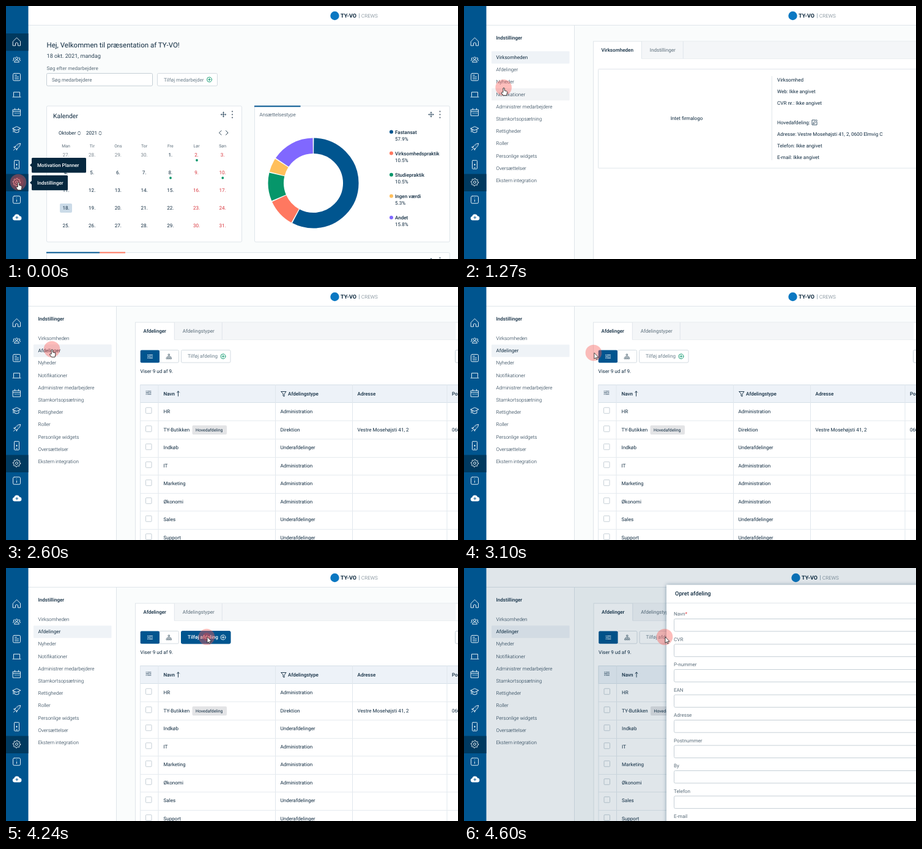
Write an HTML page that moves like this. It is 739x415 px and loops after 4.98 s.

```html
<!DOCTYPE html>
<html lang="da">
<head>
<meta charset="utf-8">
<style>
html, body { margin: 0; width: 100%; height: 100%; overflow: hidden; background: #fff }
svg { display: block; width: 739px; height: 415px }
text { font-family: Roboto, sans-serif; white-space: pre; text-rendering: geometricPrecision }
.icon { fill: none; stroke-width: .9; stroke-linecap: round; stroke-linejoin: round }
#panel { filter: drop-shadow(0 0 3px #00335566) }
</style>
</head>
<body>
<svg id="stage" viewBox="0 0 739 415"></svg>
<script>
const LOOP = 4980;
const BLUE = '#00558f', NAVY = '#00395f', INK = '#102b40', SOFT = '#5b6d7a', LINE = '#dfe5ea', GREEN = '#06966a';

// y is the vertical middle of the text
const text = (x, y, s, { size = 8.08, fill = INK, weight = 400, anchor = 'start', id = '' } = {}) =>
  `<text ${id && `id="${id}"`} x="${x}" y="${y + size * .33}" font-size="${size}" fill="${fill}" font-weight="${weight}" text-anchor="${anchor}">${s}</text>`;
const rect = (x, y, w, h, fill = '#fff', stroke = 'none', rx = 0, id = '') =>
  `<rect ${id && `id="${id}"`} x="${x}" y="${y}" width="${w}" height="${h}" rx="${rx}" fill="${fill}" stroke="${stroke}"/>`;
const line = (x1, y1, x2, y2, stroke = LINE) => `<path d="M${x1} ${y1}L${x2} ${y2}" stroke="${stroke}"/>`;
const dot = (x, y, r, fill, id = '', opacity = 1) =>
  `<circle ${id && `id="${id}"`} cx="${x}" cy="${y}" r="${r}" fill="${fill}" opacity="${opacity}"/>`;
const icon = (x, y, d, stroke = '#fff') => `<path class="icon" transform="translate(${x} ${y})" stroke="${stroke}" d="${d}"/>`;
const group = (id, ...parts) => `<g id="${id}">${parts.flat().join('')}</g>`;
const ring = r => `M${r} 0A${r} ${r} 0 1 1 ${-r} 0A${r} ${r} 0 1 1 ${r} 0`;
const PLUS = ring(4) + 'M-2 0H2M0-2V2';
const LIST = 'M-4-2.500H-3M-1.500-2.500H4M-4 0H1M2.500 0H4M-4 2.500H-3M-1.500 2.500H4';
const TREE = 'M-1-4H1V-2H-1ZM0-2V2M-3 2V0H3V2M-4 2H-2V4H-4ZM-1 2H1V4H-1ZM2 2H4V4H2Z';

const gear = Array.from({ length: 33 }, (_, i) => {
  const a = i * Math.PI / 16, r = i % 4 < 2 ? 6.2 : 4.7;
  return `${i ? 'L' : 'M'}${(r * Math.cos(a)).toFixed(1)} ${(r * Math.sin(a)).toFixed(1)}`;
}).join('') + ring(2);

const SIDE_ICONS = [
  'M-6-1L0-7L6-1V6H2V2Q0 0-2 2V6H-6Z',
  'M2-2A2 2 0 1 1-2-2A2 2 0 1 1 2-2M-4 4Q-4 1 0 1Q4 1 4 4ZM-3.5-3A1.5 1.5 0 1 0-4 0Q-6 0-6 2M3.5-3A1.5 1.5 0 1 1 4 0Q6 0 6 2',
  'M-4-6H4Q6-6 6-4V4Q6 6 4 6H-4Q-6 6-6 4V-4Q-6-6-4-6M-3-3H0M-3 0H3M-3 3H3',
  'M-5 3V-4H5V3M-6.5 4H6.5',
  'M-6-4H6V6H-6ZM-6-1H6M-3-6V-4M3-6V-4M-3 2H-2M0 2H1M3 2H4',
  'M-6.5-2L0-5L6.5-2L0 1ZM-3.5 0V4Q0 6 3.5 4V0M-5.5-1V4',
  'M6-6Q0-6-3 1L-1 3Q6 0 6-6M-2-1L-5 0L-3 1M1 2L0 5L-1 3M-3 3L-5 5M2-2H2.1',
  'M-3-7H3Q4-7 4-6V6Q4 7 3 7H-3Q-4 7-4 6V-6Q-4-7-3-7M-1 0H1M0-1V1M-1 5H1',
  gear,
  'M-4-6H4Q6-6 6-4V4Q6 6 4 6H-4Q-6 6-6 4V-4Q-6-6-4-6M0-3V-2.9M0 0V3',
];

const sidebar = group('sidebar',
  rect(0, 0, 36.5, 415, BLUE),
  rect(0, 45, 36.5, 28.5, NAVY, 'none', 0, 'homeActive'),
  rect(0, 275.5, 36.5, 28.5, NAVY),
  SIDE_ICONS.map((d, i) => icon(17.5, 59 + 28.75 * i, d)),
  '<path d="M14 351.500a3.300 3.300 0 0 1-.7-6.500a4.600 4.600 0 0 1 8.800-.5a3.500 3.500 0 0 1-.4 7Z" fill="#fff"/>',
  icon(17.8, 347, 'M-2 0H2M0-2V2', BLUE));

const header = group('header',
  rect(36, 0, 703, 31), line(36, 31.5, 739, 31.5),
  group('brand', dot(537.5, 16, 7.2, '#0b78c2'),
    text(547, 16, 'TY-VO', { size: 9, weight: 700 }),
    line(577.5, 12, 577.5, 20, '#9fb0bc'),
    text(581, 16, 'CREWS', { size: 8, weight: 300, fill: SOFT })));

const cardTools = (x, y) => icon(x, y, 'M-4 0H4M0-4V4M-1-3L0-4L1-3M-1 3L0 4L1 3M-3-1L-4 0L-3 1M3-1L4 0L3 1', '#29465c') +
  [-5, 0, 5].map(d => dot(x + 14.5, y + d, 1.2, '#7c8a95')).join('');

const DAYS = ['Man', 'Tir', 'Ons', 'Tor', 'Fre', 'Lør', 'Søn'];
const colX = c => 98 + 42.7 * c;
const dates = Array.from({ length: 35 }, (_, i) => {
  const day = i < 4 ? 27 + i : i - 3, col = i % 7;
  const fill = i < 4 ? '#7b8790' : col > 4 ? '#d8343c' : INK;
  return text(colX(col), 244.5 + 29 * Math.floor(i / 7), day + '.', { fill, anchor: 'middle' });
});

const SHARES = [
  ['Fastansat', 57.9, BLUE], ['Virksomhedspraktik', 10.5, '#ff7860'], ['Studiepraktik', 10.5, GREEN],
  ['Ingen værdi', 5.3, '#ffbf5c'], ['Andet', 15.8, '#8068ff'],
];
let sum = 0;
const donut = SHARES.map(([name, pct, color], i) => {
  const y = 207 + 35.1 * i;
  const arc = `<circle cx="502.5" cy="290.5" r="61.3" pathLength="100" fill="none" stroke="${color}" stroke-width="25.500"
    stroke-dasharray="${pct - .4} 100" stroke-dashoffset="${-sum - .2}" transform="rotate(-90 502.500 290.500)"/>`;
  sum += pct;
  return arc + dot(630, y - .5, 3, color) + text(636, y, name, { weight: 500 }) + text(636, y + 11, pct + '%');
});

const dashboard = group('dashboard',
  text(66.5, 64.5, 'Hej, Velkommen til præsentation af TY-VO!', { size: 11.54 }),
  text(66.5, 81.5, '18 okt. 2021, mandag', { size: 9.2, fill: '#2f4658' }),
  text(66.5, 102, 'Søg efter medarbejdere', { fill: SOFT }),
  rect(66.5, 110.5, 173, 20.5, '#fff', '#c5cfd6', 2),
  text(75, 121, 'Søg medarbejdere', { fill: SOFT }),
  rect(247.5, 110.5, 98, 20.5, '#fff', '#d3dbe1', 2),
  text(258, 121, 'Tilføj medarbejder', { fill: '#6c7f8c' }), icon(332.5, 120.7, PLUS, GREEN),
  rect(66.5, 164, 319, 223, '#fff', LINE, 2), rect(406.5, 164, 319, 223, '#fff', LINE, 2),
  rect(66.5, 404.5, 659, 40, '#fff', LINE, 2),
  rect(406, 163.5, 75.5, 2, BLUE), rect(66, 403.5, 87, 2, BLUE), rect(153, 403.5, 42, 2, '#ff7860'),
  cardTools(355.5, 178), cardTools(695, 178), cardTools(695, 418),
  text(77, 181, 'Kalender', { size: 10.4 }),
  text(86, 208.5, 'Oktober'), text(131, 208.5, '2021'),
  [119.5, 154].map(x => icon(x, 208.5, 'M-2-1L0-3L2-1M-2 1L0 3L2 1', INK)),
  icon(350.5, 208, 'M1.500-3.500L-2 0L1.500 3.500M9-3.500L12.500 0L9 3.500', INK),
  DAYS.map((d, i) => text(colX(i), 230, d, { size: 6.92, fill: SOFT, anchor: 'middle' })),
  rect(88, 324, 20, 15, '#cbdbe8', 'none', 2), dates,
  dot(312, 253, 1.9, GREEN), dot(269, 282, 1.9, GREEN), dot(354.3, 282, 1.9, GREEN),
  text(414.5, 178.5, 'Ansættelsestype', { weight: 300 }), donut);

const tooltip = (id, y, w, s) => group(id, rect(42, y - 12, w, 24.5, '#06283f', 'none', 1.5),
  `<path d="M42 ${y - 3}L39 ${y}L42 ${y + 3}Z" fill="#06283f"/>`, text(51, y + .3, s, { fill: '#fff', weight: 500 }));
const tooltips = tooltip('tipOld', 261, 89, 'Motivation Planner') + tooltip('tip', 289.7, 59, 'Indstillinger');

const MENU = ['Virksomheden', 'Afdelinger', 'Nyheder', 'Notifikationer', 'Administrer medarbejdere', 'Stamkortsopsætning',
  'Rettigheder', 'Roller', 'Personlige widgets', 'Oversættelser', 'Ekstern integration'];
const ROW = 20.2;
const menu = group('menu',
  rect(36, 32, 144, 383), line(180.5, 32, 180.5, 415),
  text(52.5, 52.3, 'Indstillinger', { weight: 500 }),
  rect(45, 74.3, 127.5, ROW, '#f2f4f6', 'none', 1, 'hover'), rect(45, 74.3, 127.5, ROW, '#eff3f7', 'none', 1, 'selected'),
  MENU.map((s, i) => text(52.5, 84.3 + ROW * i, s, { weight: 300, id: 'item' + i })));

const tabs = (first, x1, second, x2) => [
  rect(211.5, 58, 540, 370, '#fff', LINE),
  rect(x1, 58.5, 460, 28, '#f4f6f8'), line(x1, 58, x1, 86.5), line(x2, 58, x2, 86.5), line(x1, 86.5, 739, 86.5, '#eaeef1'),
  text(224.5, 72.2, first, { weight: 500 }), text(x1 + 13.5, 72.2, second, { fill: SOFT })];

const company = group('company',
  tabs('Virksomheden', 290.3, 'Indstillinger', 358.3),
  rect(219.5, 103.5, 540, 162.5, '#fff', LINE, 1), line(503.3, 115, 503.3, 253),
  text(364, 184.7, 'Intet firmalogo', { anchor: 'middle' }),
  [[121, 'Virksomhed'], [140, 'Web: Ikke angivet'], [159, 'CVR nr.: Ikke angivet'], [191, 'Hovedafdeling:'],
    [210, 'Adresse: Vestre Mosehøjsti 41, 2, 0600 Elmvig C'], [229, 'Telefon: Ikke angivet'], [248, 'E-mail: Ikke angivet']]
    .map(([y, s]) => text(512, y + .2, s)),
  icon(573, 191, 'M1-4H-4V4H4V-1M-2 2L-1.500 0L3-4.500L4.500-3L0 1.500Z', '#29465c'));

const DEPARTMENTS = [['HR', 'Administration'], ['TY-Butikken', 'Direktion'], ['Indkøb', 'Underafdelinger'], ['IT', 'Administration'],
  ['Marketing', 'Administration'], ['Økonomi', 'Administration'], ['Sales', 'Underafdelinger'], ['Support', 'Underafdelinger']];
const rowY = i => i ? 234.3 + 29.5 * (i - 1) : 204.3;
const addButton = (id, fill, stroke, ink, mark, weight) => group(id, rect(286.5, 103.5, 80.5, 20.5, fill, stroke, 2),
  text(297, 113.8, 'Tilføj afdeling', { fill: ink, weight }), icon(355, 113.8, PLUS, mark));

const departments = group('departments',
  tabs('Afdelinger', 275.3, 'Afdelingstyper', 353.3),
  rect(250.5, 103.5, 32, 20.5, '#fff', '#d3dbe1', 2), rect(219.7, 103.4, 31.3, 20.8, BLUE, 'none', 2),
  icon(235.5, 114, LIST), icon(266.5, 114, TREE, '#6c7f8c'),
  addButton('add', '#fff', '#d3dbe1', '#6c7f8c', GREEN, 400), addButton('addHover', BLUE, BLUE, '#fff', '#fff', 500),
  rect(734.5, 103.5, 20, 20.5, '#fff', '#c5cfd6', 2),
  text(219.5, 138.3, 'Viser 9 ud af 9.'),
  rect(219.5, 160.5, 540, 29, '#edf2f8', '#d5dfe8'),
  icon(233, 173.5, LIST, '#29465c'),
  text(257.5, 175.3, 'Navn', { weight: 500 }), icon(281.5, 175, 'M0 4V-4M-2-2L0-4L2-2', INK),
  icon(454, 175.5, 'M-4-4H4L1 0V4L-1 3V0Z', INK), text(461, 175.8, 'Afdelingstype', { weight: 500 }),
  text(574.5, 175, 'Adresse', { weight: 500 }), text(729, 175, 'Postnummer', { weight: 500 }),
  [219.5, 249, 440.5, 566.5, 721].map(x => line(x, 160, x, 415, '#e0e7ed')),
  DEPARTMENTS.map(([name, type], i) => {
    const y = rowY(i), bottom = Math.round(y + 15) + .5;
    return text(257.5, y, name) + text(448.5, y, type) + rect(228.5, y - 6.5, 9.5, 9.5, '#fff', '#c5cfd6', 1) +
      line(219, bottom, 739, bottom, '#e6ebef');
  }),
  rect(304.5, 227, 56.5, 15, '#e3e4e6', 'none', 2), text(310, 234.5, 'Hovedafdeling', { size: 6.92 }),
  text(574.5, 234.3, 'Vestre Mosehøjsti 41, 2'), text(729, 234.3, '0600'));

const FIELDS = ['Navn<tspan fill="#e0393e">*</tspan>', 'CVR', 'P-nummer', 'EAN', 'Adresse', 'Postnummer', 'By', 'Telefon', 'E-mail'];
const panel = rect(36, 0, 703, 415, '#003355', 'none', 0, 'dim') + group('panel',
  rect(331, 27.6, 420, 400), line(331, 57.5, 739, 57.5),
  text(345, 42.2, 'Opret afdeling', { size: 9.24, weight: 500 }),
  FIELDS.map((s, i) => text(343, 75.8 + 41.5 * i, s, { fill: SOFT }) + rect(343.5, 83.5 + 41.5 * i, 420, 20.4, '#fff', '#c5cfd6', 2)));

const pointer = group('pointer', dot(0, 0, 13.3, '#fa5a55', '', .4), dot(0, 0, 9, '#e83c46', 'ripple'),
  '<path id="hand" d="M-.8 8V1.200Q.4 0 1.500 1.200V5L5 6Q6.200 6.500 6 8L5 13H-.5L-3.500 9Q-3.500 7.500-2.300 7.700Z" fill="#fff" stroke="#222" stroke-width=".9"/>',
  '<path id="arrow" d="M1 0V10L3.300 8L4.900 11.300L6.300 10.600L4.800 7.400H8Z" fill="#fff" stroke="#222" stroke-width=".8"/>');

document.getElementById('stage').innerHTML = rect(0, 0, 739, 415, '#fafcfc') +
  header + dashboard + menu + company + departments + panel + sidebar + tooltips + pointer;

const el = id => document.getElementById(id);
const show = (id, on) => el(id).setAttribute('opacity', +on);
const clamp = v => Math.min(1, Math.max(0, v));
const span = (t, a, b) => clamp((t - a) / (b - a));
const smooth = p => p * p * (3 - 2 * p);

const MENU_AT = 330, COMPANY_AT = 570, DEPARTMENTS_AT = 2400, MODAL_AT = 4330;
const CLICKS = [-150, 1960, 4180];
const PATH = [[0, 20, 289], [500, 20, 291], [800, 20, 291], [1270, 64.7, 133.7], [1800, 75, 102], [2600, 75, 102], [3550, 328, 113], [LOOP, 328, 113]];

function pointerAt(t) {
  const i = PATH.findIndex(k => k[0] > t);
  const [t0, x0, y0] = PATH[i - 1], [t1, x1, y1] = PATH[i];
  const p = smooth(span(t, t0, t1));
  const bow = t0 === 800 ? 18 * Math.sin(Math.PI * p) : 0;
  return [x0 + (x1 - x0) * p + bow, y0 + (y1 - y0) * p];
}

function draw(t) {
  const [x, y] = pointerAt(t);
  const onMenu = t >= MENU_AT, onDepartments = t >= DEPARTMENTS_AT, modal = t >= MODAL_AT;
  show('dashboard', !onMenu);
  show('homeActive', !onMenu);
  show('tip', !onMenu);
  show('tipOld', 1 - span(t, 20, 130));
  show('menu', onMenu);
  show('company', t >= COMPANY_AT && !onDepartments);
  show('departments', onDepartments);

  const selected = +onDepartments;
  el('selected').setAttribute('y', 74.3 + ROW * selected);
  MENU.forEach((_, i) => el('item' + i).setAttribute('font-weight', i === selected ? 400 : 300));
  const row = Math.floor((y + 3 - 74.3) / ROW);
  const inMenu = x > 45 && x < 172;
  show('hover', onMenu && inMenu && row >= 0 && row < MENU.length);
  el('hover').setAttribute('y', 74.3 + ROW * row);

  const onAdd = x > 287 && !modal;
  show('addHover', onAdd);
  show('dim', .12 * span(t, MODAL_AT, MODAL_AT + 120));
  const slide = 1 - (1 - span(t, MODAL_AT, 4590)) ** 3;
  el('panel').setAttribute('transform', `translate(${420 * (1 - slide)} 0)`);
  el('brand').setAttribute('transform', `translate(${modal ? 5 : 0} 0)`);
  el('departments').setAttribute('transform', `translate(${modal ? .5 : 0} 0)`);

  el('pointer').setAttribute('transform', `translate(${x} ${y})`);
  const click = CLICKS.map(c => (t - c) / 300).find(p => p >= 0 && p < 1) ?? 1;
  el('ripple').setAttribute('r', 5 + 8 * click);
  show('ripple', .4 * (1 - click));
  const hand = x < 172;
  show('hand', hand);
  show('arrow', !hand);
}

const start = performance.now();
function tick() {
  draw((performance.now() - start) % LOOP);
  requestAnimationFrame(tick);
}
tick();
</script>
</body>
</html>
```
